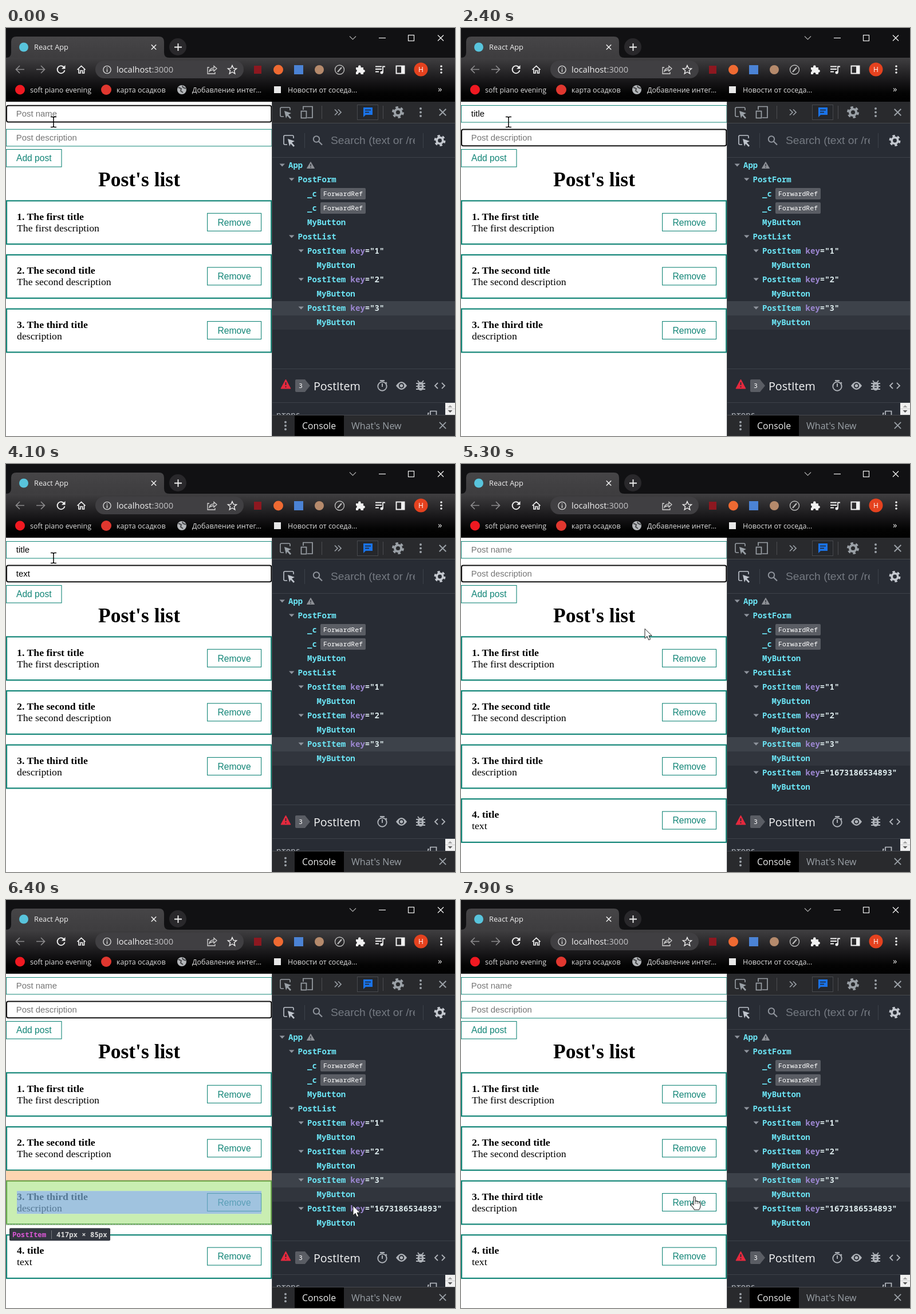
Recreate the animation shown at these times as an HTML page. Size 784 by 714 pixels, loop 8000 ms.

```html
<!DOCTYPE html>
<html lang="en">
<head>
<meta charset="utf-8">
<title>Post form demo</title>
<style>
  html, body { margin: 0; width: 100%; height: 100%; overflow: hidden; background: #fff; }
  svg { display: block; width: 784px; height: 714px; }
  text { white-space: pre; }
  .ui { font-family: "Open Sans", "Noto Sans", sans-serif; }
  .arial { font-family: "Liberation Sans", Arial, sans-serif; }
  .times { font-family: "Liberation Serif", "Times New Roman", serif; }
  .mono { font-family: "Noto Sans Mono", "DejaVu Sans Mono", monospace; }
</style>
</head>
<body>
<svg id="stage" viewBox="0 0 784 714" xmlns="http://www.w3.org/2000/svg">
  <defs>
    <linearGradient id="tabFill" x2="0" y2="1"><stop stop-color="#464547"/><stop offset="1" stop-color="#3e3d3f"/></linearGradient>
    <linearGradient id="barFill" x2="0" y2="1"><stop stop-color="#403f41"/><stop offset=".55" stop-color="#161517"/><stop offset=".8" stop-color="#040404"/><stop offset="1" stop-color="#000"/></linearGradient>
    <clipPath id="searchClip"><rect x="560" y="180" width="154" height="34"/></clipPath>
  </defs>
  <g id="page"></g>
  <g id="fields"></g>
  <g id="overlay"></g>
  <g id="devtools"></g>
  <g id="tree"></g>
  <g id="details"></g>
  <g id="chrome"></g>
  <g id="pointer"></g>
</svg>
<script>
const LOOP = 8000, STEP = 100;
const TEAL = '#128577', GREY = '#9aa0a6';
const SUBMIT = 4500, PRESS = 7800, TAB = 1800;
const titleKeys = [500, 700, 850, 1050, 1200];
const textKeys = [2900, 3100, 3300, 3500];
const layer = id => document.getElementById(id);

const rect = (x, y, w, h, fill, extra = '') =>
  `<rect x="${x}" y="${y}" width="${w}" height="${h}" fill="${fill}" ${extra}/>`;
const frame = (x, y, w, h, color, line = 1, r = 0) =>
  rect(x, y, w, h, 'none', `stroke="${color}" stroke-width="${line}" rx="${r}"`);
const text = (x, y, s, size, fill, font = 'ui', extra = '') =>
  `<text x="${x}" y="${y}" class="${font}" font-size="${size}" fill="${fill}" ${extra}>${s}</text>`;
const stroke = (d, color, w = 1.5, extra = '') =>
  `<path d="${d}" fill="none" stroke="${color}" stroke-width="${w}" ${extra}/>`;
const fill = (d, color, extra = '') => `<path d="${d}" fill="${color}" ${extra}/>`;
const dot = (x, y, r, color) => `<circle cx="${x}" cy="${y}" r="${r}" fill="${color}"/>`;
const ring = (x, y, r, color, w = 1.5, extra = '') =>
  `<circle cx="${x}" cy="${y}" r="${r}" fill="none" stroke="${color}" stroke-width="${w}" ${extra}/>`;
const dots = (x, y, gap, color, r = 1.8) => [-1, 0, 1].map(i => dot(x, y + i * gap, r, color)).join('');
const cross = (x, y, r, color, w = 1.5) =>
  stroke(`M${x - r} ${y - r}L${x + r} ${y + r}M${x + r} ${y - r}L${x - r} ${y + r}`, color, w);
const gear = (x, y, r, color, hole) =>
  ring(x, y, r * .85, color, r * .4, `stroke-dasharray="${r * .445}"`) +
  dot(x, y, r * .76, color) + dot(x, y, r * .36, hole);
const inspect = (x, y, color) =>
  stroke(`M${x + 6} ${y + 16}H${x + 2}Q${x} ${y + 16} ${x} ${y + 14}V${y + 2}Q${x} ${y} ${x + 2} ${y}H${x + 15}Q${x + 17} ${y} ${x + 17} ${y + 2}V${y + 5}`, color, 1.6) +
  fill(`M${x + 7} ${y + 6}L${x + 19} ${y + 10}L${x + 14} ${y + 12.5}L${x + 19} ${y + 18}L${x + 17} ${y + 20}L${x + 12} ${y + 14.5}L${x + 10} ${y + 19}Z`, color);

function drawChrome() {
  const w = '#f1f1f1';
  let s = rect(0, 0, 784, 53, '#111113') + rect(0, 52, 784, 77, 'url(#barFill)');
  s += fill('M0 52Q9 52 9 43V24Q9 15 18 15H267Q276 15 276 24V43Q276 52 285 52Z', 'url(#tabFill)');
  s += dot(31, 33.5, 8, '#58c4dc') + text(49, 38, 'React App', 12.8, w);
  s += cross(258, 33.5, 4.2, w) + dot(300, 33, 15, '#29282b') + stroke('M294 33.5H307M300.5 27V40', w, 1.8);
  s += stroke('M600 14.5L605.5 20L611 14.5', '#aaa', 1.2) + stroke('M651 17.5H663', w, 1.2);
  s += frame(702.5, 12.5, 10, 10, w, 1.2) + cross(759, 17.5, 5, w, 1.3);

  s += stroke('M32 72.5H18M24 66L17.5 72.5L24 79', '#8b8a8c', 1.7) + stroke('M53 72.5H67M61 66L67.5 72.5L61 79', '#8b8a8c', 1.7);
  s += stroke('M101.5 69A6.5 6.5 0 1 0 102.5 74', w, 1.9) + fill('M103.5 65V71.5H97Z', w);
  s += stroke('M124.5 73L131.5 66.5L138.5 73M127 72V79H130V74.5H133.5V79H136.5V72', w, 1.7);
  s += rect(156, 57, 259, 31, '#403f42', 'rx="15.5"') + ring(176.5, 73, 6.6, '#d5d5d5', 1.4) + stroke('M176.5 72V77M176.5 69V70.7', '#d5d5d5', 1.5);
  s += text(193, 78, 'localhost<tspan fill="#c2c2c4">:3000</tspan>', 14.7, w);
  s += stroke('M355 69H352V80H365V77M355 76Q356 70 363 70V66.5L368 71L363 75.5V73Q358 73 355 76Z', '#d5d5d5', 1.3);
  s += stroke('M395 65.5L397.2 70.6L402.6 71L398.4 74.5L399.8 80L395 77L390.2 80L391.6 74.5L387.4 71L392.8 70.6Z', w, 1.4);

  s += rect(433, 66, 13, 14, '#8d1820') + dot(475.5, 73, 8.5, '#ef6a32') + rect(503, 65, 16, 16, '#4b83d5') + dot(547, 73, 8, '#b58a6c');
  s += ring(582.5, 73, 8, '#bbb', 1.4) + stroke('M579 77L586 69', '#bbb', 2.2);
  s += fill('M611 69H615V67.5A2.3 2.3 0 0 1 619.6 67.5V69H624V73H625A2.4 2.4 0 0 1 625 77.7H624V81H619.5V79.7A2.3 2.3 0 0 0 615 79.7V81H611V77A2.3 2.3 0 0 0 611 72.5Z', w);
  s += stroke('M645 67.5H656M645 72H656M645 76.5H651M658 78V67.5H662', w, 1.8) + dot(656, 78, 2.5, w);
  s += frame(681.5, 66.5, 14, 13, w, 2) + rect(690, 66, 6, 14, w);
  s += dot(724.5, 72.5, 12, '#e5421f') + text(724.5, 77, 'H', 12, '#fff', 'ui', 'text-anchor="middle"') + dots(760, 72.5, 5.5, w);

  const label = (x, t) => text(x, 113, t, 12.5, '#dedede');
  s += dot(24.5, 108, 8.5, '#f01921') + label(42, 'soft piano evening');
  s += dot(175, 108, 9, '#e0372f') + label(193, 'карта осадков');
  s += dot(307, 108, 8, '#b4b7ba') + stroke('M301 104L306 106L305 110L309 113M308 101L309 104L314 106', '#48494b', 2) + label(325, 'Добавление интег...');
  s += rect(468, 102, 12, 12, '#e8e8e8') + label(492, 'Новости от соседа...');
  layer('chrome').innerHTML = s + text(754, 112, '»', 15, w);
}

function drawDevtools() {
  let s = rect(464, 129, 320, 585, '#282c34') + rect(464, 129, 320, 38, '#292a2d') + rect(464, 166, 320, 1, '#484a4e');
  s += inspect(479, 139, GREY) + stroke('M519 143V137.5H535V157H526', GREY, 1.7) + frame(515.5, 145.5, 9, 12, GREY, 1.7);
  s += rect(551, 136, 1, 23, '#4b4d51') + stroke('M574 142.5L579 147.5L574 152.5M580 142.5L585 147.5L580 152.5', GREY, 1.7);
  s += rect(613.5, 134.5, 36, 26, '#25272b', 'stroke="#47494d"') + fill('M624 139H640V152H628L624 156Z', '#1a73e8') + stroke('M627 143.5H637M627 147.5H634', '#23262b', 1.4);
  s += rect(658, 136, 1, 23, '#4b4d51') + gear(684.5, 147.5, 10, GREY, '#292a2d') + dots(724, 147.5, 6.5, GREY, 2) + cross(762.5, 147.5, 5.8, GREY, 2);
  s += inspect(485, 188, '#bfc4cc') + rect(521, 184, 1, 26, '#3d424a') + ring(542, 194.5, 5.2, '#8f949c', 2) + stroke('M546 198.5L552 204.5', '#8f949c', 2.2);
  s += `<g clip-path="url(#searchClip)">${text(567, 203, 'Search (text or /regex/)', 19.2, '#757a82', 'arial')}</g>`;
  s += rect(728, 184, 1, 26, '#3d424a') + gear(757.5, 197, 9.5, '#c4c8cf', '#282c34') + rect(464, 226, 320, 1, '#3d424a');
  layer('devtools').innerHTML = s + rect(464, 129, 1, 585, '#494c50');

  const icon = '#afb3b9';
  s = rect(465, 596, 319, 1, '#3d424a') + fill('M488.5 615L497 631H480Z', '#e5293e', 'stroke="#e5293e" stroke-linejoin="round"') + stroke('M488.5 620V625M488.5 627V629', '#282c34', 1.8);
  s += fill('M507 615H522L531 626L522 637H507Q505 637 505 635V617Q505 615 507 615Z', '#5a5d64') + text(511, 630, '3', 11.5, '#fff', 'mono');
  s += text(537, 634, 'PostItem', 19.7, '#f4f5f6');
  s += ring(657, 627, 7.7, icon, 1.9) + stroke('M653 617H661M657 622V628M663 620L665 622', icon, 1.9);
  s += fill('M681 626Q690.5 612 700 626Q690.5 640 681 626Z', icon) + dot(690.5, 626, 4.7, '#282c34') + dot(690.5, 626, 2.8, icon);
  s += `<ellipse cx="724" cy="627" rx="5.5" ry="7.5" fill="${icon}"/>` + stroke('M716 622H732M716 627H732M716 632H732M719 617L722 621M729 617L726 621', icon, 2) + stroke('M722 625H726M722 629H726', '#282c34', 1.6);
  s += stroke('M754 621L749 626L754 631M761 621L766 626L761 631', icon, 1.9) + rect(465, 655, 319, 1, '#3d424a');
  s += text(472, 682, 'props', 14, '#b8bcc2', 'mono') + stroke('M741 677V670.5H751.5V677M737 677V674H739', '#b8bcc2', 1.7);
  s += rect(767, 656, 17, 21, '#f0f0f0') + fill('M775.5 660L779.5 664H771.5Z', '#a3a3a3') + rect(767, 666, 17, 1, '#ccc') + fill('M771.5 669H779.5L775.5 673Z', '#555');
  s += rect(465, 677, 319, 37, '#292a2d') + rect(465, 677, 319, 1, '#484a4e') + rect(504, 678, 86, 36, '#000') + dots(488, 696, 6.3, GREY, 2);
  s += text(517, 702, 'Console', 15.8, '#eceded') + text(603, 702, "What's New", 16, GREY) + cross(762.5, 695.5, 5.6, GREY, 1.9);
  layer('details').innerHTML = s;
}

const itemY = i => 302 + 94.6 * i;
const posts = [['The first title', 'The first description'], ['The second title', 'The second description'],
  ['The third title', 'description'], ['title', 'text']];

function drawPage(count) {
  let s = rect(0, 128, 465, 586, '#fff') + frame(.5, 212.5, 96.5, 30.5, TEAL, 1.1) + text(18, 233, 'Add post', 15.6, TEAL, 'arial');
  s += text(161, 276.8, "Post's list", 35.5, '#000', 'times', 'font-weight="700"');
  posts.slice(0, count).forEach(([title, body], i) => {
    const y = itemY(i);
    s += frame(1, y + .4, 462.2, 75.8, TEAL, 2.2);
    s += text(19, y + 33.6, `${i + 1}. ${title}`, 17.75, '#000', 'times', 'font-weight="700"') + text(19, y + 53.6, body, 17.75, '#000', 'times');
    s += frame(351.6, y + 22.3, 94, 31, TEAL, 1.1) + text(369.5, y + 43.6, 'Remove', 15.6, TEAL, 'arial');
  });
  layer('page').innerHTML = s;
}

const nodes = [[0, 'App'], [1, 'PostForm'], [2, '_c'], [2, '_c'], [2, 'MyButton', 1], [1, 'PostList']];
[1, 2, 3, 1673186534893].forEach(key => nodes.push([2, 'PostItem', 0, key], [3, 'MyButton', 1]));

function drawTree(count, hover) {
  let s = rect(465, 478, 319, 25, '#3d424a') + rect(465, 503, 319, 25, '#31353d');
  if (hover >= 0) s += rect(465, 228 + 25 * hover, 319, 25, '#3d424a');
  nodes.slice(0, 6 + 2 * count).forEach(([depth, name, leaf, key], row) => {
    const x = 493 + 16.5 * depth, y = 240 + 25 * row;
    const attr = key ? ` <tspan fill="#9d87d2">key</tspan><tspan fill="#dbe8ea">="${key}"</tspan>` : '';
    s += text(x, y + 4.8, name + attr, 14, '#6be4f4', 'mono', 'font-weight="600"');
    if (name === '_c') s += rect(549, y - 10, 79, 20, '#5a5d64', 'rx="2"') + text(554, y + 4, 'ForwardRef', 11.5, '#fff', 'mono', 'font-weight="500"');
    else if (!leaf) s += fill(`M${x - 15.5} ${y - 2.5}h9.5l-4.75 5z`, '#8f949d');
  });
  s += fill('M532 234.5L538.5 245.5H525.5Z', '#8d9096', 'stroke="#8d9096" stroke-linejoin="round"') + stroke('M532 238V242M532 243.3V244.8', '#282c34', 1.4);
  layer('tree').innerHTML = s;
}

function drawOverlay(hover) {
  let s = '';
  if (hover >= 0) {
    const y = itemY((hover - 6) >> 1), button = hover % 2;
    const green = 'rgba(77,200,0,.3)', blue = 'rgba(120,170,210,.7)';
    const [x, top, w, h] = button ? [351, y + 22, 95, 32] : [0, y, 464, 77];
    if (button) s += rect(x, top, w, h, green) + rect(369, top + 7, 59, 18, blue);
    else {
      s += rect(0, y - 18, 464, 18, 'rgba(250,140,40,.36)');
      s += fill(`M0 ${y}h464v77h-464zM19 ${y + 18}v40h427v-40z`, green, 'fill-rule="evenodd"') + rect(19, y + 18, 427, 40, blue);
    }
    s += frame(x + 1, top + .8, w - 2, h - 1.5, 'rgba(255,200,50,.3)', 2);
    s += stroke(`M${x} ${top + h - .5}h${w}`, '#aaa', 1, 'stroke-dasharray="3 2"');
    const left = button ? 287 : 6, tip = top + h + 6;
    s += rect(left, tip, 176, 22, '#333740', 'rx="2"') + rect(left + 73, tip + 4, 1, 15, '#77797f');
    s += text(left + 5, tip + 15.5, nodes[hover][1], 12.3, '#d957d4', 'mono', 'font-weight="700"');
    s += text(left + 82, tip + 15.5, button ? '85px × 28px' : '417px × 85px', 12.3, '#d7d7d7', 'mono', 'font-weight="600"');
  }
  layer('overlay').innerHTML = s;
}

const typed = (word, keys, t) => t < SUBMIT ? word.slice(0, keys.filter(k => k <= t).length) : '';

function drawFields(t) {
  const focus = t >= PRESS ? -1 : t >= TAB ? 1 : 0;
  const lastInput = Math.max(...[-600, TAB, SUBMIT, ...titleKeys, ...textKeys].filter(k => k <= t));
  const caretOn = (t - lastInput) % 1060 < 530;
  const values = [typed('title', titleKeys, t), typed('text', textKeys, t)];
  layer('fields').innerHTML = ['Post name', 'Post description'].map((hint, i) => {
    const y = 135 + 41.8 * i, on = focus === i;
    return (on ? frame(1, y + .8, 462.3, 28.6, '#101010', 2, 3) : frame(.5, y + .5, 463.5, 29.5, TEAL, 1)) +
      text(17.8, y + 20, values[i] || hint, 14.9, values[i] ? '#000' : '#757575', 'arial');
  }).join('');
  if (focus < 0 || !caretOn) return;
  const box = layer('fields').querySelectorAll('text')[focus];
  const x = values[focus] ? 18 + box.getComputedTextLength() : 18;
  layer('fields').innerHTML += rect(x, 142 + 41.5 * focus, 1.2, 16.5, '#000');
}

const path = [[0, 83, 165], [4900, 83, 165], [5500, 440, 350], [5700, 560, 384], [6000, 602, 392], [6100, 602, 408],
  [6400, 606, 535], [6600, 590, 545], [6800, 480, 548], [7000, 375, 545], [7300, 404, 524], [7500, 406, 519], [LOOP, 406, 519]];

function pointerAt(t) {
  const i = Math.max(1, path.findIndex(p => p[0] >= t));
  const [t0, x0, y0] = path[i - 1], [t1, x1, y1] = path[i];
  const k = (t - t0) / (t1 - t0);
  return [x0 + (x1 - x0) * k, y0 + (y1 - y0) * k];
}

const beam = stroke('M-5 -9.5H-2Q0 -9.5 0 -7.5Q0 -9.5 2 -9.5H5M0 -8V7M-5 8.5H-2Q0 8.5 0 6.5Q0 8.5 2 8.5H5', '#000', 1.5);
const arrow = fill('M0 0V17L4 13.2L6.8 19.6L9.7 18.3L7 12.1H12.2Z', '#fff', 'stroke="#222" stroke-width="1"');
const hand = fill('M0 1.5Q0 0 1.5 0Q3.2 0 3.2 2V8Q5 7 6.5 8.6Q8.5 7.8 9.5 9.6Q12 9 12.2 12V16Q12 20 9.5 23H1.5Q0 20 -4 15.5Q-5.5 13.5 -4 12.6Q-2 12 0 14.5Z', '#fff', 'stroke="#222" stroke-width="1.1"') +
  stroke('M3.2 8V13M6.5 8.6V13M9.5 9.6V13', '#444', .9);

function drawPointer(t) {
  const [x, y] = pointerAt(t);
  const overButton = x > 351 && x < 446 && y > 513 && y < 545;
  const shape = y <= 207 ? beam : overButton ? hand : arrow;
  layer('pointer').innerHTML = `<g transform="translate(${x} ${y})">${shape}</g>`;
}

// The inspected row trails the pointer by one step.
function hoveredRow(t) {
  const [x, y] = pointerAt(Math.max(0, t - STEP));
  const row = Math.round((y - 240) / 25);
  return x > 465 && row >= 6 && row < nodes.length ? row : -1;
}

function render(t) {
  const count = t < SUBMIT ? 3 : 4, hover = hoveredRow(t);
  drawPage(count);
  drawFields(t);
  drawOverlay(hover);
  drawTree(count, hover);
  drawPointer(t);
}

drawChrome();
drawDevtools();
const start = performance.now();
let shown = -1;
function tick() {
  const t = Math.floor((performance.now() - start) % LOOP / STEP) * STEP;
  if (t !== shown) render(shown = t);
  requestAnimationFrame(tick);
}
tick();
</script>
</body>
</html>
```
